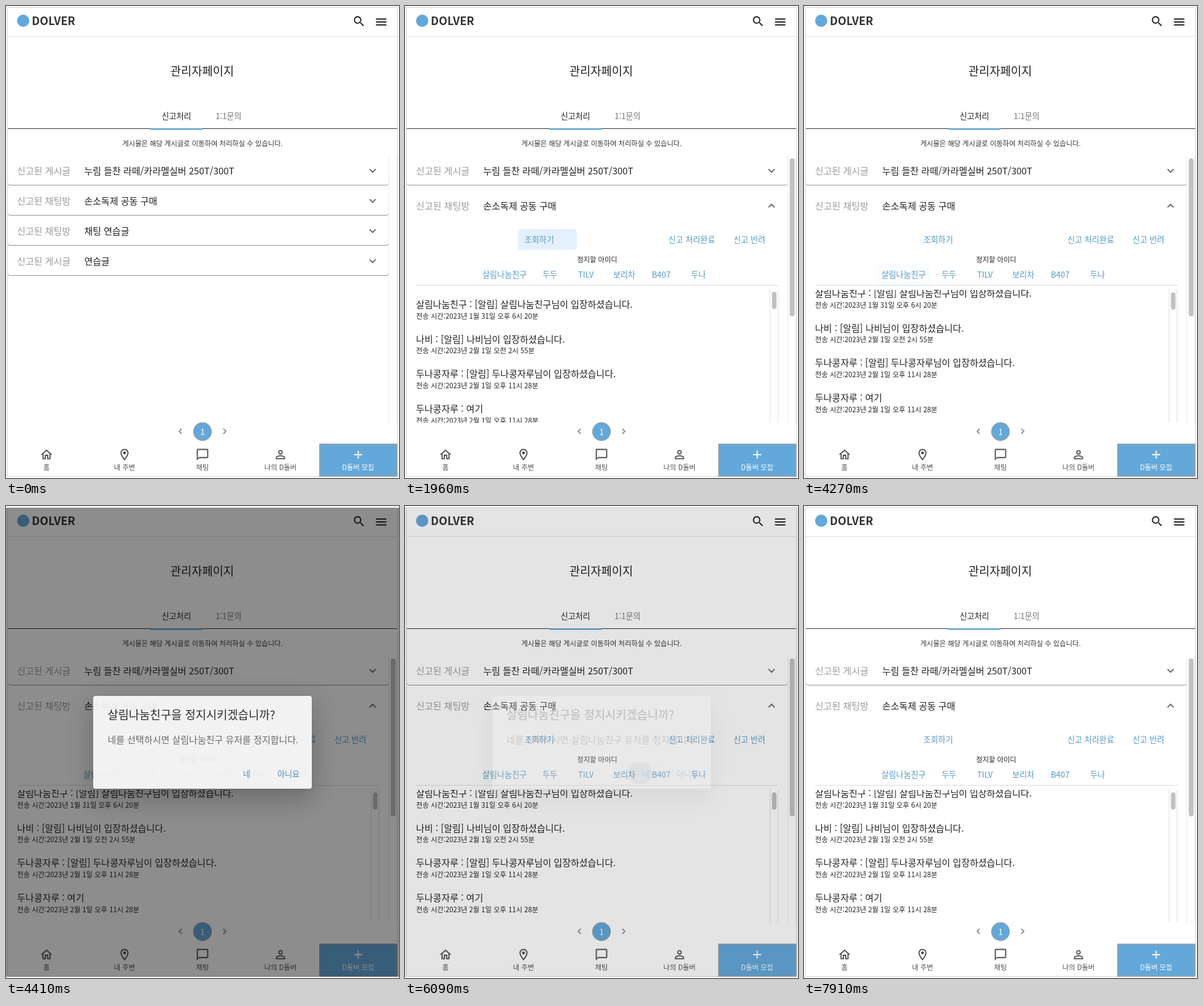
An HTML page for the animation above (8000 ms loop, 640 px wide and 768 px high).

```html
<!DOCTYPE html>
<html lang="ko">
<head>
<meta charset="utf-8">
<style>
html, body { margin: 0; width: 100%; height: 100%; overflow: hidden; background: #fff; }
svg, #backdrop, #dialog { position: absolute; left: 0; top: 0; width: 640px; height: 768px; }
svg { overflow: hidden; }
text { font-family: "Noto Sans CJK KR", "Noto Sans CJK", sans-serif; }
.card { fill: #fff; filter: drop-shadow(0 1px .7px rgba(0,0,0,.42)); }
#backdrop { top: 3px; height: 763px; background: #000; }
#paper {
  position: absolute; left: 142px; top: 309px; width: 356px; height: 151px;
  background: #fff; border-radius: 4px;
  box-shadow: 0 11px 15px -7px rgba(0,0,0,.1), 0 24px 38px 3px rgba(0,0,0,.1), 0 9px 46px 8px rgba(0,0,0,.13);
}
</style>
</head>
<body>
<svg id="page" viewBox="0 0 640 768"></svg>
<div id="backdrop"></div>
<div id="dialog"><div id="paper"></div><svg id="prompt" viewBox="0 0 640 768"></svg></div>
<script>
const BLUE = '#63a8da', LINK = '#559ac7', INK = '#222', GRAY = '#9b9b9b', RIM = '#93a0a8';
const $ = id => document.getElementById(id);

// y is the visual middle of the line
const text = (x, y, size, fill, str, extra = '') =>
  `<text x="${x}" y="${y + size * .4}" font-size="${size}" fill="${fill}" ${extra}>${str}</text>`;
const mid = (x, y, size, fill, str, extra = '') =>
  text(x, y, size, fill, str, `text-anchor="middle" ${extra}`);
const rect = (x, y, w, h, fill, extra = '') =>
  `<rect x="${x}" y="${y}" width="${w}" height="${h}" fill="${fill}" ${extra}/>`;
const icon = (x, y, scale, fill, d, extra = '') =>
  `<g transform="translate(${x} ${y}) scale(${scale})"><path ${extra} transform="translate(-12 -12)" fill="${fill}" d="${d}"/></g>`;
const clip = (id, x, y, w, h, r = 0) =>
  `<clipPath id="${id}"><rect x="${x}" y="${y}" width="${w}" height="${h}" rx="${r}"/></clipPath>`;
const ripple = (id, clipId, x, y, fill) =>
  `<g clip-path="url(#${clipId})"><circle id="${id}" cx="${x}" cy="${y}" fill="${fill}"/></g>`;

const CHEVRON = 'M16.59 8.59 12 13.17 7.41 8.59 6 10l6 6 6-6z';
const SEARCH = 'M15.5 14h-.79l-.28-.27C15.41 12.59 16 11.11 16 9.5 16 5.91 13.09 3 9.5 3S3 5.91 3 9.5 5.91 16 9.5 16c1.61 0 3.09-.59 4.23-1.57l.27.28v.79l5 4.99L20.49 19l-4.99-5zm-6 0C7.01 14 5 11.99 5 9.5S7.01 5 9.5 5 14 7.01 14 9.5 11.99 14 9.5 14z';
const MENU = 'M3 18h18v-2H3zm0-5h18v-2H3zm0-7v2h18V6z';
const HOME = 'M12 5.69l5 4.5V18h-2v-6H9v6H7v-7.81l5-4.5M12 3 2 12h3v8h6v-6h2v6h6v-8h3z';
const PIN = 'M12 2C8.13 2 5 5.13 5 9c0 5.25 7 13 7 13s7-7.75 7-13c0-3.87-3.13-7-7-7zM7 9c0-2.76 2.24-5 5-5s5 2.24 5 5c0 2.88-2.88 7.19-5 9.88C9.92 16.21 7 11.85 7 9zm2.5 0a2.5 2.5 0 1 0 5 0a2.5 2.5 0 1 0-5 0z';
const CHAT = 'M20 2H4c-1.1 0-2 .9-2 2v18l4-4h14c1.1 0 2-.9 2-2V4c0-1.1-.9-2-2-2zm0 14H6l-2 2V4h16z';
const PERSON = 'M12 5.9c1.16 0 2.1.94 2.1 2.1s-.94 2.1-2.1 2.1S9.9 9.16 9.9 8s.94-2.1 2.1-2.1m0 9c2.97 0 6.1 1.46 6.1 2.1v1.1H5.9V17c0-.64 3.13-2.1 6.1-2.1M12 4C9.79 4 8 5.79 8 8s1.79 4 4 4 4-1.79 4-4-1.79-4-4-4zm0 9c-2.67 0-8 1.34-8 4v3h16v-3c0-2.66-5.33-4-8-4z';
const PLUS = 'M19 13h-6v6h-2v-6H5v-2h6V5h2v6h6z';

const USER = '살림나눔친구';
const rows = [
  ['게시글', '누림 들찬 라떼/카라멜실버 250T/300T'],
  ['채팅방', '손소독제 공동 구매'],
  ['채팅방', '채팅 연습글'],
  ['게시글', '연습글'],
];
const suspects = [[126, USER], [224, '두두'], [282, 'TILV'], [339, '보리차'], [402, 'B407'], [466, '두나']];
const entered = name => `${name} : [알림] ${name}님이 입장하셨습니다.`;
const messages = [
  [entered(USER), '1월 31일 오후 6시 20분'],
  [entered('나비'), '2월 1일 오전 2시 55분'],
  [entered('두나콩자루'), '2월 1일 오후 11시 28분'],
  ['두나콩자루 : 여기', '2월 1일 오후 11시 28분'],
];
const nav = [[66, HOME, '홈'], [193, PIN, '내 주변'], [320, CHAT, '채팅'], [447, PERSON, '나의 D돌버']];

const row = ([kind, title], i) => `<g id="row${i}">
  <rect id="card${i}" class="card" x="3" y="0" width="620" height="47" rx="4"/>
  <g id="head${i}">${text(18, 24, 15, GRAY, '신고된 ' + kind)}${text(127.5, 24, 15, INK, title)}
  ${icon(597, 24, .94, '#666', CHEVRON, `id="arrow${i}"`)}</g></g>`;

const chat = `<g id="chat">
  ${mid(313, 412, 11.25, INK, '정지할 아이디')}
  ${rect(118, 420, 89, 34, '#3f95d8', 'id="userHover" rx="4"')}
  ${suspects.map(([x, name]) => text(x, 437, 13.1, LINK, name)).join('')}
  ${rect(18, 454, 590, 1, '#ddd')}
  <g clip-path="url(#chatClip)"><g id="log">
    ${messages.map(([line, time], i) => text(18, 485.2 + i * 56.6, 15, INK, line) +
      text(18, 504.3 + i * 56.6, 11.3, INK, '전송 시간:2023년 ' + time)).join('')}
  </g></g>
  ${rect(594, 461, 1, 217, '#e0e0e0')}${rect(607, 461, 1, 217, '#e0e0e0')}
  ${rect(597.5, 465, 7.5, 28, '#c1c1c1', 'id="thumb" rx="3.75"')}
</g>`;

const details = `<g clip-path="url(#detailClip)">
  ${rect(185, 363, 94, 34, '#3f95d8', 'id="viewHover" rx="4"')}
  ${ripple('viewRipple', 'viewClip', 232, 380, '#3f95d8')}
  ${text(194.5, 380, 13.1, LINK, '조회하기')}
  ${text(429, 380, 13.1, LINK, '신고 처리완료')}${text(535, 380, 13.1, LINK, '신고 반려')}
  ${chat}</g>`;

$('page').innerHTML = `<defs>
  ${clip('listClip', 0, 245, 640, 433)}${clip('chatClip', 3, 462, 590, 216)}${clip('viewClip', 184, 363, 96, 34, 4)}
  <clipPath id="detailClip"><rect id="detailBox" x="3" y="357" width="620"/></clipPath></defs>
  ${rect(2.5, 2.5, 635, 763, 'none', 'stroke="#d6d6d6"')}
  <circle cx="28" cy="24" r="10" fill="${BLUE}"/>
  ${text(42, 23.5, 18.2, '#333', 'DOLVER', 'font-weight="700"')}
  ${icon(575, 25, .94, INK, SEARCH)}${icon(611, 26, .94, INK, MENU)}
  ${rect(3, 49, 634, 1, '#e0e0e0')}
  ${mid(319.5, 105, 18.75, INK, '관리자페이지')}
  ${mid(277.5, 179, 13.1, INK, '신고처리', 'font-weight="500"')}${mid(362.5, 179, 13.1, '#757575', '1:1문의')}
  ${rect(3, 199, 634, 1, '#333')}${rect(235, 199, 85, 2.5, '#62a3d0')}
  ${mid(320, 223, 11.3, '#333', '게시물은 해당 게시글로 이동하여 처리하실 수 있습니다.')}
  ${rect(623, 245, 1, 433, '#e8e8e8')}${rect(636, 245, 1, 433, '#e8e8e8')}
  <g clip-path="url(#listClip)">
    ${row(rows[0], 0)}${row(rows[1], 1)}${details}${row(rows[2], 2)}${row(rows[3], 3)}
    ${rect(626.5, 248, 8, 257, '#c1c1c1', 'id="listThumb" rx="4"')}
  </g>
  ${icon(284, 692, .78, '#808080', 'M15.41 7.41 14 6l-6 6 6 6 1.41-1.41L10.83 12z')}
  ${icon(356, 692, .78, '#808080', 'M10 6 8.59 7.41 13.17 12l-4.58 4.59L10 18l6-6z')}
  <circle cx="320" cy="692.5" r="14.5" fill="${BLUE}" stroke="${RIM}" stroke-width="1.3"/>
  ${mid(320, 692.3, 13, '#fff', '1')}
  ${nav.map(([x, d, label]) => icon(x, 730, .94, '#505050', d) + mid(x, 750, 11.3, '#505050', label)).join('')}
  ${rect(511, 713, 125.5, 52, BLUE, `stroke="${RIM}" stroke-width="1.8"`)}
  ${icon(573.5, 730, .94, '#fff', PLUS)}${mid(573.5, 750, 11.3, '#fff', 'D돌버 모집')}`;

$('prompt').innerHTML = `<defs>${clip('yesClip', 360, 418, 64, 34, 4)}</defs>
  ${text(165.5, 339, 18.75, INK, USER + '을 정지시키겠습니까?', 'font-weight="500"')}
  ${text(165.5, 380, 15, '#666', `네를 선택하시면 ${USER} 유저를 정지합니다.`)}
  ${rect(360, 418, 64, 34, '#3f95d8', 'id="yesHover" rx="4"')}
  ${ripple('yesRipple', 'yesClip', 383, 435, '#4f5a62')}
  ${mid(392, 435.5, 13.1, '#3f8fc6', '네')}${mid(460, 435.5, 13.1, '#3f8fc6', '아니요')}`;

const clamp = v => Math.max(0, Math.min(1, v));
// cubic-bezier(.4, 0, .2, 1), solved by bisection
function ease(v) {
  v = clamp(v);
  let lo = 0, hi = 1;
  for (let i = 0; i < 24; i++) {
    const s = (lo + hi) / 2, r = 1 - s;
    if (1.2 * r * r * s + .6 * r * s * s + s ** 3 < v) lo = s; else hi = s;
  }
  return lo * lo * (3 - 2 * lo);
}
const set = (id, attrs) => { for (const k in attrs) $(id).setAttribute(k, attrs[k]); };
const move = (id, y) => set(id, { transform: `translate(0 ${y})` });

function render(t) {
  const ramp = (start, length) => ease((t - start) / length);
  const open = ramp(840, 300);
  const loaded = t >= 1930;
  const grow = loaded ? 600 : open * 72;

  rows.forEach((_, i) => move('row' + i, 244 + i * 49 + (i > 1 ? grow : 0)));
  set('card1', { height: 47 + grow });
  move('head1', open * 8);
  set('arrow1', { transform: `rotate(${open * 180}) translate(-12 -12)` });
  set('detailBox', { height: loaded ? 330 : Math.max(0, grow - 16) });

  set('viewHover', { opacity: .02 * (ramp(1600, 250) - ramp(2270, 250)) });
  set('viewRipple', { r: 68 * ramp(1820, 300), opacity: .12 * (1 - ramp(1960, 550)) });
  set('chat', { visibility: loaded ? 'visible' : 'hidden' });
  set('listThumb', { visibility: loaded ? 'visible' : 'hidden' });

  const scroll = 18 * (1 - (1 - clamp((t - 2870) / 350)) ** 1.4);
  move('log', -scroll);
  move('thumb', scroll / 18);
  set('userHover', { opacity: .025 * (ramp(3960, 250) - ramp(4270, 250)) });

  const shown = ramp(4270, 225) - ramp(5990, 195);
  $('backdrop').style.opacity = shown * .5;
  $('dialog').style.opacity = shown;
  set('yesHover', { opacity: .04 * ramp(5250, 250) });
  set('yesRipple', { r: 44 * ramp(5910, 550), opacity: .25 });
}

function tick() {
  const now = performance.now() % 8000;
  render(Math.floor(now / 70) * 70);
  requestAnimationFrame(tick);
}
tick();
</script>
</body>
</html>
```
